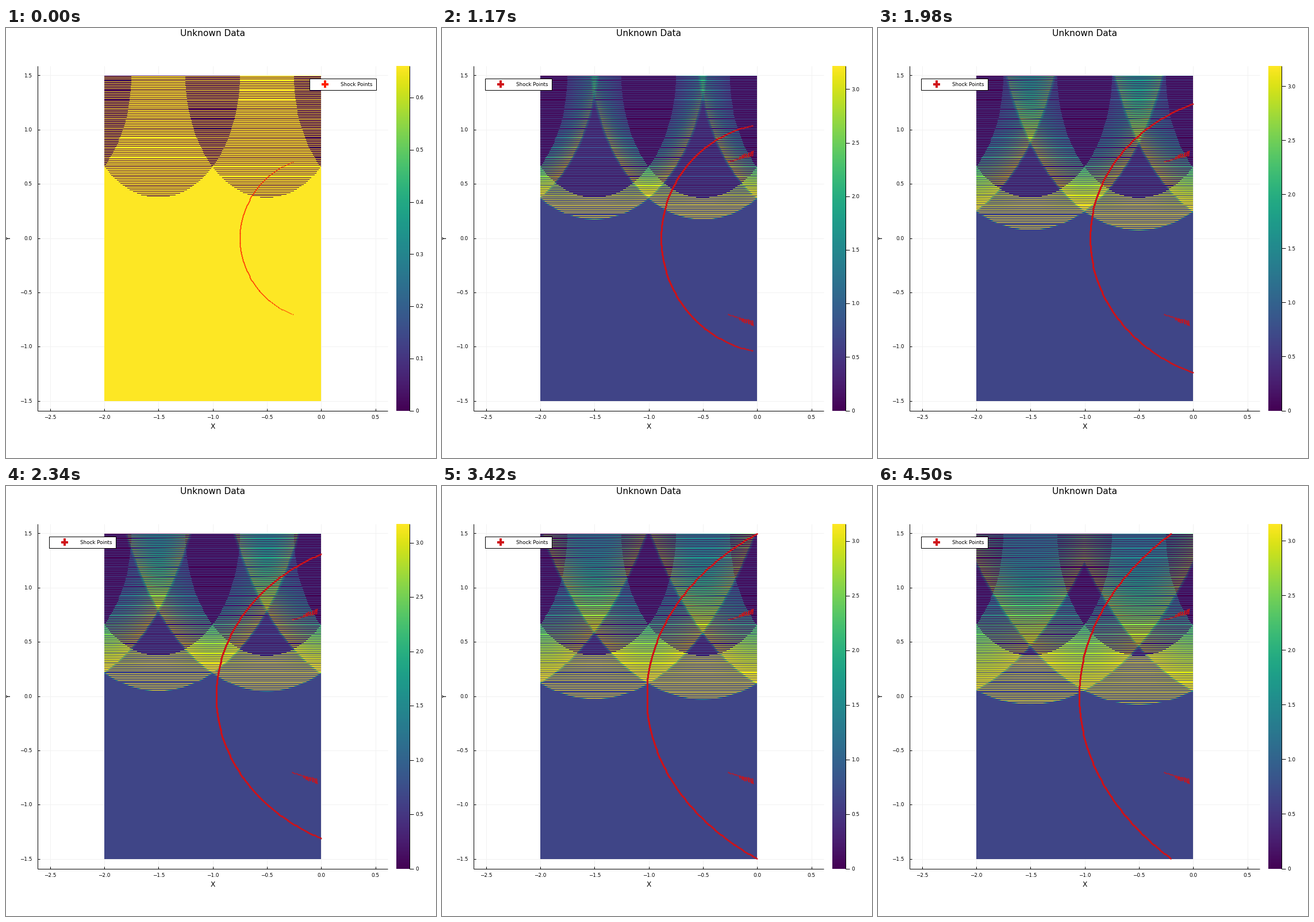
A matplotlib script for the animation above (4590 ms loop, 748 by 748 pixels).

```python
import numpy as np
import matplotlib.pyplot as plt
from matplotlib.animation import FuncAnimation
from matplotlib.patches import Rectangle

SIZE, DPI = 748, 100
FRAMES, STEP_MS = 51, 90
PT = 72 / DPI              # points per pixel
UNIT = 188.67              # pixels per data unit
X0, Y0 = 548.5, 365.5      # pixel position of the data origin
LEFT, RIGHT, TOP, BOTTOM = 55.5, 664.5, 65.5, 665.5
NX, NY, CELL = 400, 600, 0.005
BODY, FREE = 0.75, 0.6615  # body radius, free-stream value

# Shock front as a conic: y^2 = width * s + bend * s^2, with s = x + nose
KEYS = [0, 6, 13, 22, 31, 38, 50]
NOSE = [0.75, 0.823, 0.887, 0.952, 0.992, 1.02, 1.053]
WIDTH = [1.5, 1.798, 2.124, 2.346, 2.576, 2.757, 3.057]
BEND = [-1, -1, -1, -0.767, -0.605, -0.54, -0.482]
X_END = [-0.26, -0.15, -0.04, 0, 0, 0, 0]
PEAK_KEYS = [0, 1, 3, 6, 13, 22, 31, 38, 50]
PEAK = [FREE, 3.05, 3.25, 3.237, 3.22, 3.191, 3.155, 3.16, 3.157]

plt.rcParams["font.family"] = "DejaVu Sans"


def px(x):
    return X0 + UNIT * np.asarray(x)


def py(y):
    return Y0 - UNIT * np.asarray(y)


def folded_grid():
    """Polar coordinates of the cell under each pixel, with the 400 columns
    of 600 cells laid out row by row in rows of 400."""
    cols = np.arange(377)
    rows = np.arange(566)
    c = np.minimum(((cols + 0.5) / 377 * NX).astype(int), NX - 1)
    r = np.minimum(((565.5 - rows) / 566 * NY).astype(int), NY - 1)
    flat = r[:, None] * NX + c[None, :]
    x = -2 + (flat // NY + 0.5) * CELL
    y = -1.5 + (flat % NY + 0.5) * CELL
    radius = np.hypot(x, y)
    return radius, -x / radius, np.abs(y) / radius


RADIUS, COS, SIN = folded_grid()


def front(n):
    return [np.interp(n, KEYS, k) for k in (NOSE, WIDTH, BEND)]


def field(n, peak):
    if n == 0:
        return np.where(RADIUS < BODY, 0, FREE)
    nose, width, bend = front(n)
    a = SIN**2 - bend * COS**2
    b = COS * (width + 2 * bend * nose)
    c = width * nose + bend * nose**2
    shock = (-b + np.sqrt(b * b + 4 * a * c)) / (2 * a)

    # Jump across the moving front from its normal Mach number
    gx = width + 2 * bend * (nose - shock * COS)
    gy = 2 * shock * SIN
    g = np.hypot(gx, gy)
    t = n / (FRAMES - 1)
    mach = ((4.9 - 0.7 * t) * gx + (2 - t) * gy) / g
    behind = FREE * 6 * mach**2 / (mach**2 + 5)
    wall = peak * (0.16 + 0.84 * COS**2) ** 0.75

    depth = np.clip((RADIUS - BODY) / np.maximum(shock - BODY, 1e-3), 0, 1)
    layer = wall + (behind - wall) * depth**1.1
    edge = np.clip((shock - RADIUS) / (0.006 + 0.024 * SIN**2), 0, 1)
    value = FREE + (np.minimum(layer, peak) - FREE) * edge
    return np.where(RADIUS < BODY, 0, value)


def spur(n):
    """Small comb of stray points beside the body shoulder."""
    reach = -0.27 + 0.23 * min(1, n / 5)
    x = np.arange(-0.27, reach, 0.012)
    y = 0.705 + 0.27 * (x + 0.27)
    xs, ys = [x], [y]
    for i, tx in enumerate(np.arange(-0.165, reach + 0.002, 0.02)):
        base = 0.708 + 0.3 * (tx + 0.27)
        ty = np.arange(base, base + 0.016 + 0.004 * (i % 3) + 0.002 * i, CELL)
        xs.append(tx + 0.25 * (ty - base))
        ys.append(ty)
    return np.concatenate(xs), np.concatenate(ys)


def shock_points(n):
    nose, width, bend = front(n)
    step = CELL if n == 0 else CELL / 3
    y = np.arange(-1.5 + CELL / 2, 1.5, step)
    root = width**2 + 4 * bend * y**2
    y, root = y[root > 0], root[root > 0]
    x = -nose + (-width + np.sqrt(root)) / (2 * bend)
    keep = x <= np.interp(n, KEYS, X_END)
    x, y = x[keep], y[keep]
    if n:
        sx, sy = spur(n)
        x = np.concatenate([x, sx, sx])
        y = np.concatenate([y, sy, -sy])
    snap = lambda v: (np.floor(v / CELL) + 0.5) * CELL
    return px(snap(x)), py(snap(y))


fig = plt.figure(figsize=(SIZE / DPI, SIZE / DPI), dpi=DPI, facecolor="white")
ax = fig.add_axes([0, 0, 1, 1])


def line(xs, ys, color="black", width=1, z=4):
    return ax.plot(xs, ys, color=color, lw=width * PT, zorder=z,
                   solid_capstyle="butt")[0]


def label(x, y, text, size, ha="center", **kw):
    return ax.text(x, y, text, fontsize=size * PT, ha=ha, va="baseline",
                   zorder=8, **kw)


def number(v):
    return f"{v:.1f}".replace("-", "\u2212")


# Grid, axes and labels
for v in np.arange(-2.5, 0.6, 0.5):
    line([px(v)] * 2, [TOP, BOTTOM], "#f1f1f1", z=1)
    line([px(v)] * 2, [BOTTOM - 4, BOTTOM])
    label(px(v), 680.3, number(v), 8.85)
for v in np.arange(-1.5, 1.6, 0.5):
    line([LEFT, RIGHT], [py(v)] * 2, "#f1f1f1", z=1)
    line([LEFT, LEFT + 4], [py(v)] * 2)
    label(45.3, py(v) + 3.2, number(v), 8.85, ha="right")
line([LEFT, LEFT], [TOP, BOTTOM + 0.5])
line([LEFT - 0.5, RIGHT], [BOTTOM, BOTTOM])
label(360, 13.5, "Unknown Data", 15.4)
label(360, 697.4, "X", 12.1)
ax.text(10.6, Y0, "Y", fontsize=12.1 * PT, rotation=90, ha="right",
        va="center", rotation_mode="default")

# Heat map, points and colour bar
heat = ax.imshow(field(0, FREE), cmap="viridis", interpolation="nearest",
                 extent=(171, 548, 649, 83), aspect="auto", zorder=2)
dots, = ax.plot([], [], ls="none", marker="s", mew=0, zorder=5)
ax.imshow(np.linspace(1, 0, 600)[:, None], cmap="viridis",
          interpolation="nearest", extent=(679, 702, 666, 66),
          aspect="auto", zorder=2)
line([702, 702], [TOP, BOTTOM + 0.5])
bar_ticks = [line([702, 709.5], [0, 0]) for _ in range(7)]
bar_labels = [label(712, 0, "", 8.85, ha="left") for _ in range(7)]

# Legend
box = ax.add_patch(Rectangle((0, 88), 116, 19.5, fc="white", ec="black",
                             lw=PT, zorder=6))
arm_h = line([0, 0], [97.7, 97.7], width=4, z=7)
arm_v = line([0, 0], [91.4, 104], width=4, z=7)
caption = label(0, 101.2, "Shock Points", 8.8, ha="left")

ax.set_xlim(0, SIZE)
ax.set_ylim(SIZE, 0)
ax.axis("off")


def draw(n):
    peak = np.interp(n, PEAK_KEYS, PEAK)
    heat.set_data(field(n, peak))
    heat.set_clim(0, peak)

    red = "#ff2000" if n == 0 else "#d01218"
    dots.set_data(*shock_points(n))
    dots.set_color(red)
    dots.set_markersize((1.4 if n == 0 else 1.9) * PT)

    gap = 0.1 if n == 0 else 0.5
    for i, (tick, text) in enumerate(zip(bar_ticks, bar_labels)):
        v = i * gap
        y = BOTTOM - 600 * v / peak
        tick.set_ydata([y, y])
        text.set_y(y + 3.2)
        text.set_text("0" if i == 0 else number(v))
        tick.set_visible(v <= peak)
        text.set_visible(v <= peak)

    x = 528.5 if n == 0 else 75.5
    box.set_x(x)
    mid = x + 26.7
    arm_h.set_xdata([mid - 6.3, mid + 6.3])
    arm_v.set_xdata([mid, mid])
    arm_h.set_color(red)
    arm_v.set_color(red)
    caption.set_x(x + 53.3)
    return []


anim = FuncAnimation(fig, draw, frames=FRAMES, init_func=lambda: draw(0),
                     interval=STEP_MS, repeat=True, repeat_delay=0, blit=False)
plt.show()
```
